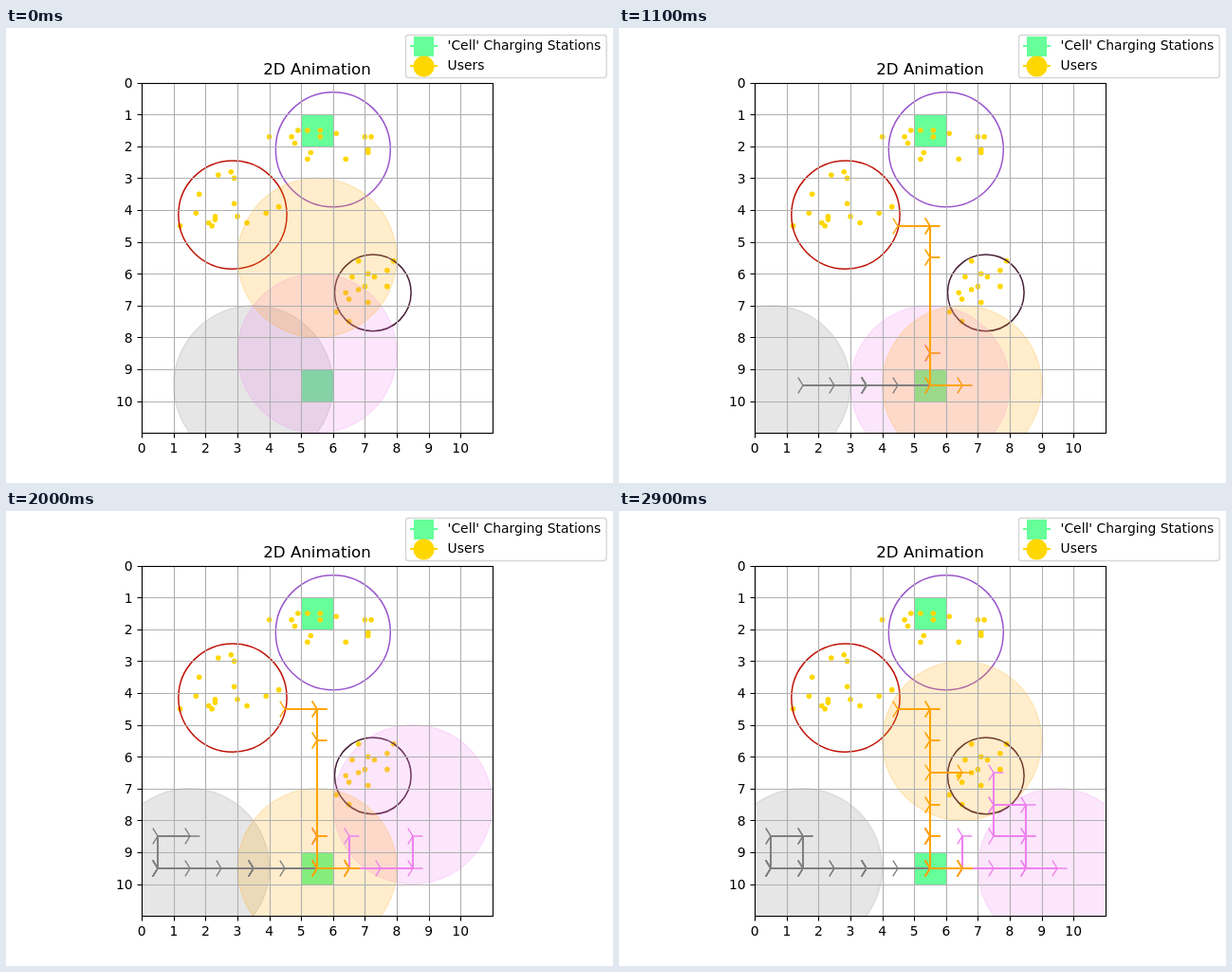
These frames come from a looping animation (640 by 480 pixels, 3 s). An HTML page:

```html
<!DOCTYPE html>
<html lang="en">
<head>
<meta charset="utf-8">
<title>2D Animation</title>
<style>
  html, body { margin: 0; width: 100%; height: 100%; overflow: hidden; background: #fff; }
  svg { display: block; width: 640px; height: 480px; }
  text { font-family: "DejaVu Sans", sans-serif; font-size: 13.89px; fill: #000; }
</style>
</head>
<body>
<svg id="stage" viewBox="0 0 640 480" xmlns="http://www.w3.org/2000/svg"></svg>
<script>
const NS = 'http://www.w3.org/2000/svg';
const stage = document.getElementById('stage');
const CELL = 33.6, LEFT = 143.2, TOP = 57.6, SIZE = 11;
const STEP = 100, STEPS = 30;
const GREEN = '#66ff99', GOLD = '#ffd700';

const px = x => LEFT + x * CELL;
const py = y => TOP + y * CELL;
const crisp = v => Math.round(v) + 0.5;

function add(parent, tag, attrs, text) {
  const el = document.createElementNS(NS, tag);
  for (const k in attrs) el.setAttribute(k, attrs[k]);
  if (text !== undefined) el.textContent = text;
  parent.appendChild(el);
  return el;
}
const group = (attrs = {}) => add(stage, 'g', attrs);

const clip = add(add(stage, 'defs', {}), 'clipPath', { id: 'plot' });
add(clip, 'rect', { x: LEFT, y: TOP, width: SIZE * CELL, height: SIZE * CELL });

add(stage, 'rect', { width: 640, height: 480, fill: '#fff' });
const field = group({ 'clip-path': 'url(#plot)' });
const grid = group({ stroke: '#b0b0b0', 'stroke-width': 1.11 });
const trails = group({ 'clip-path': 'url(#plot)', fill: 'none' });
const frame = group({ stroke: '#000', 'stroke-width': 1.11, fill: 'none' });
const labels = group();

// Charging stations
for (const y of [1, 9])
  add(field, 'rect', { x: 311, y: Math.round(py(y)), width: 34, height: 34, fill: GREEN });

// Users
const users = [
  [4, 1.7], [4.7, 1.7], [4.8, 1.9], [4.9, 1.5], [5.2, 1.5], [5.6, 1.5], [5.6, 1.7], [6.1, 1.6],
  [5.3, 2.2], [5.2, 2.4], [6.4, 2.4], [7, 1.7], [7.2, 1.7], [7.1, 2.1], [7.1, 2.2],
  [2.4, 2.9], [2.8, 2.8], [2.9, 3], [1.8, 3.5], [1.7, 4.1], [1.2, 4.5], [2.3, 4.2], [2.3, 4.3],
  [2.1, 4.4], [2.2, 4.5], [2.9, 3.8], [3, 4.2], [3.3, 4.4], [3.9, 4.1], [4.3, 3.9],
  [6.8, 5.6], [7.9, 5.6], [7.1, 6], [7.3, 6.1], [6.6, 6.1], [7.7, 5.9], [7.7, 6.4], [7, 6.4],
  [6.8, 6.5], [6.4, 6.6], [6.5, 6.8], [7.1, 6.9], [6.1, 7.2], [6.5, 7.5]
];
for (const [x, y] of users)
  add(field, 'circle', { cx: px(x), cy: py(y), r: 2.8, fill: GOLD });

// User clusters
const clusters = [[6, 2.1, 1.8, '#9955cc'], [2.85, 4.15, 1.7, '#bf1408'], [7.25, 6.6, 1.2, '#4a2038']];
for (const [x, y, r, color] of clusters)
  add(field, 'circle', {
    cx: px(x), cy: py(y), r: r * CELL, fill: 'none', stroke: color, 'stroke-width': 1.5
  });

// Grid, axes and ticks
const x0 = crisp(LEFT), x1 = crisp(px(SIZE)), y0 = crisp(TOP), y1 = crisp(py(SIZE));
for (let i = 0; i < SIZE; i++) {
  const gx = crisp(px(i)), gy = crisp(py(i));
  add(grid, 'path', { d: `M${gx} ${y0}V${y1}M${x0} ${gy}H${x1}` });
  add(frame, 'path', { d: `M${gx} ${y1}v5M${x0} ${gy}h-5` });
  add(labels, 'text', { x: px(i), y: 447.6, 'text-anchor': 'middle' }, i);
  add(labels, 'text', { x: 133.6, y: py(i) + 5.3, 'text-anchor': 'end' }, i);
}
add(frame, 'rect', { x: x0, y: y0, width: x1 - x0, height: y1 - y0 });
add(labels, 'text', { x: 328, y: 49.4, 'text-anchor': 'middle', style: 'font-size:16.67px' }, '2D Animation');

// Legend
const legend = group();
add(legend, 'rect', {
  x: 421.5, y: 7.5, width: 211.6, height: 45, rx: 2.8,
  fill: '#fff', stroke: '#ccc', 'stroke-opacity': 0.8, 'stroke-width': 1.39
});
add(legend, 'path', { d: 'M426 19H455', stroke: GREEN, 'stroke-width': 2.08 });
add(legend, 'rect', { x: 430, y: 9, width: 21, height: 21, fill: GREEN });
add(legend, 'path', { d: 'M426 40H455', stroke: GOLD, 'stroke-width': 2.08 });
add(legend, 'circle', { cx: 440.5, cy: 40.5, r: 11, fill: GOLD });
add(legend, 'text', { x: 465.6, y: 23.4 }, "'Cell' Charging Stations");
add(legend, 'text', { x: 465.6, y: 44.4 }, 'Users');

// Moves: U, D, L, R one cell; S stay; C go to the charger
const moves = { U: [0, -1], D: [0, 1], L: [-1, 0], R: [1, 0], S: [0, 0] };
const charger = [5.5, 9.5];

function walk(start, route) {
  const cells = [start];
  for (const m of route) {
    const [x, y] = cells[cells.length - 1];
    cells.push(m === 'C' ? charger : [x + moves[m][0], y + moves[m][1]]);
  }
  return cells;
}

function makeAgent(color, start, route) {
  const cells = walk(start, route);
  const points = cells.map(([x, y]) => [Math.round(px(x)), Math.round(py(y))]);
  const disc = add(field, 'circle', {
    r: 2.5 * CELL, fill: color, stroke: color, 'stroke-width': 1.39,
    'fill-opacity': 0.2, 'stroke-opacity': 0.2
  });
  const line = add(trails, 'polyline', {
    stroke: color, 'stroke-width': 2.08, 'stroke-linejoin': 'round', 'stroke-linecap': 'square'
  });
  const marks = points.map(([x, y]) => add(trails, 'path', {
    d: `M${x} ${y}h10.42M${x - 5.21} ${y - 8.33}L${x} ${y}L${x - 5.21} ${y + 8.33}`,
    stroke: color, 'stroke-width': 1.39
  }));
  return { cells, points, disc, line, marks };
}

const agents = [
  makeAgent('#808080', [3.5, 9.5], 'SSSSSCLLLLLSSSSSSURDRLUDULDSR'),
  makeAgent('#ee82ee', [5.5, 8.5], 'SSSSSSSSDRLRUDSSRRUULUDDRDRLR'),
  makeAgent('#ffa500', [5.5, 5.5], 'SULRSCUDRLRLRLRLUDRLUUDDUUURU')
];

// The trail ends one step behind the disc
function show(step) {
  for (const a of agents) {
    const [x, y] = a.cells[step];
    a.disc.setAttribute('cx', px(x));
    a.disc.setAttribute('cy', py(y));
    a.line.setAttribute('points', step > 1 ? a.points.slice(0, step).join(' ') : '');
    a.marks.forEach((m, i) => m.setAttribute('display', i < step ? 'inline' : 'none'));
  }
}

let origin = null, shown = 0;
function tick(now) {
  if (origin === null) origin = now;
  const step = Math.floor(Math.max(0, now - origin) / STEP) % STEPS;
  if (step !== shown) show(shown = step);
  requestAnimationFrame(tick);
}
show(0);
requestAnimationFrame(tick);
</script>
</body>
</html>
```
